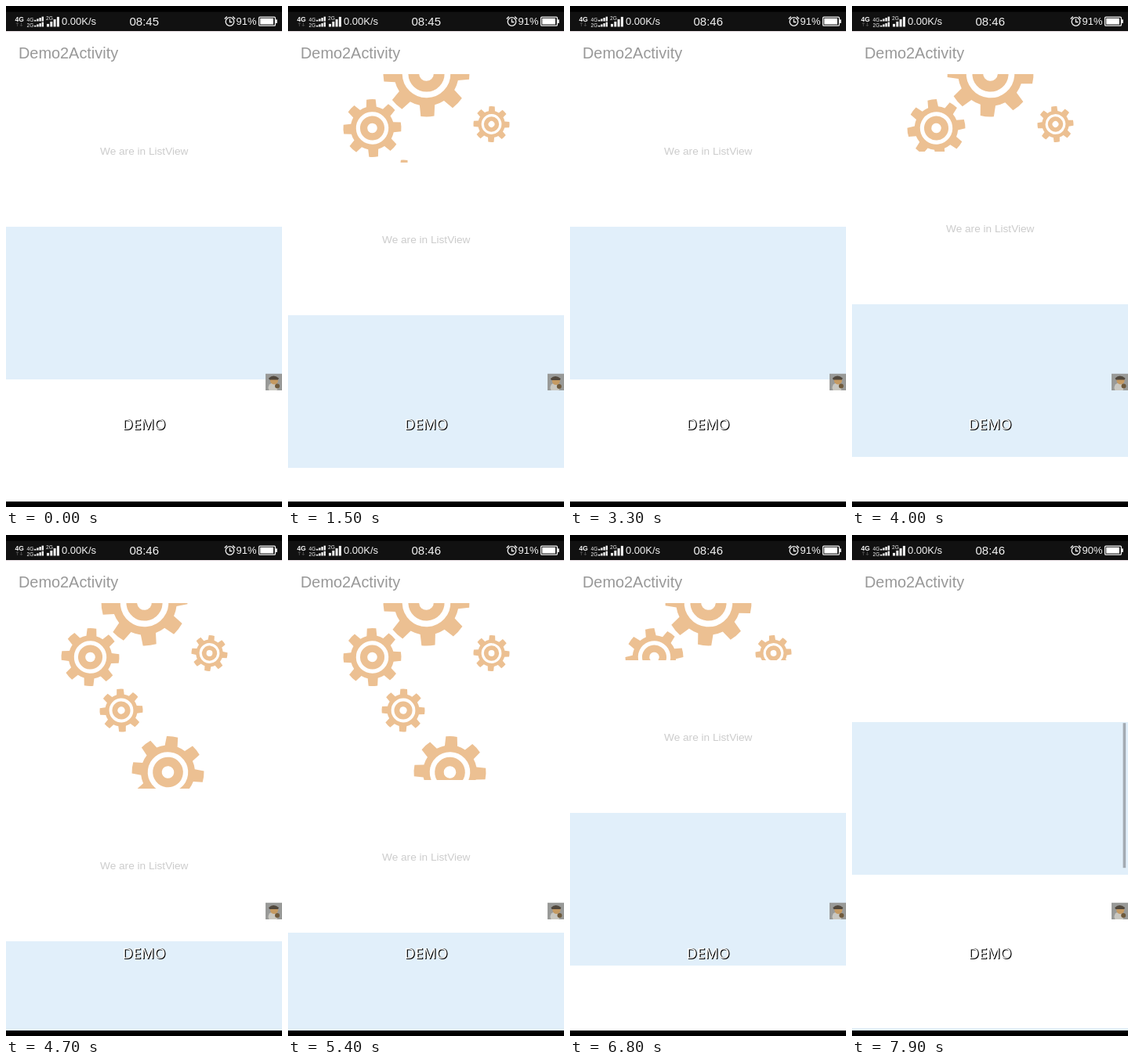
Animation of 352x640 px, one loop 8 s. Source, as an HTML page:

```html
<!DOCTYPE html>
<html lang="en">
<head>
<meta charset="utf-8">
<title>Pull to refresh demo</title>
<style>
  html, body { margin: 0; width: 100%; height: 100%; overflow: hidden; background: #fff; }
  svg { display: block; width: 352px; height: 640px; }
  text { font-family: "Liberation Sans", Arial, sans-serif; }
  .status text { fill: #f2f2f2; }
  .status .tiny { font-size: 6.6px; }
  .demo { font: 18.6px "Noto Sans", sans-serif; fill: #fff; text-shadow: 1px 1px 0 #000, 1px 0 0 #000; }
</style>
</head>
<body>
<svg viewBox="0 0 352 640">
  <defs>
    <linearGradient id="shade" x2="0" y2="1">
      <stop offset="0" stop-color="#c9a9b8" stop-opacity=".4"/>
      <stop offset="1" stop-color="#fff" stop-opacity="0"/>
    </linearGradient>
  </defs>
  <rect width="352" height="640" fill="#fff"/>
  <g id="gears" fill="#ecc092"></g>
  <g id="list" shape-rendering="crispEdges">
    <rect y="86.5" width="352" height="1562" fill="#fff"/>
    <text x="120" y="190" font-size="13.65" fill="#ccc">We are in ListView</text>
  </g>
  <rect id="thumb" x="345.6" width="3.6" height="185" fill="#a3abb2"/>

  <rect width="352" height="86.5" fill="#fff" shape-rendering="crispEdges"/>
  <text x="16" y="67" font-size="19.9" fill="#999">Demo2Activity</text>
  <rect y="32" width="352" height="3" fill="url(#shade)"/>

  <g class="status">
    <rect width="352" height="32" fill="#111"/>
    <rect width="352" height="7.5" fill="#000"/>
    <text x="11.5" y="19.5" font-size="8.5" font-weight="bold">4G</text>
    <path d="M14.5 26v-5m-1.5 2l1.5-2 1.5 2M19.5 21v5m-1.5-2l1.5 2 1.5-2" fill="none" stroke="#444"/>
    <text class="tiny" x="26.5" y="19.5">4G</text>
    <text class="tiny" x="26.5" y="26.5">2G</text>
    <text class="tiny" x="51" y="18">2G</text>
    <g id="bars" fill="#f2f2f2"></g>
    <text x="71" y="24" font-size="13">0.00K/s</text>
    <text id="clock" x="157.5" y="25" font-size="15">08:45</text>
    <g fill="none" stroke="#f2f2f2" stroke-width="1.3">
      <circle cx="285.5" cy="20" r="5.3"/>
      <path d="M285.5 16.5v4h3M278.8 16.5l3-3M292.2 16.5l-3-3"/>
      <rect x="322.6" y="14.1" width="20.8" height="11" rx="1.2"/>
    </g>
    <rect x="324.2" y="15.7" width="16.8" height="7.8" fill="#fff"/>
    <rect x="344" y="17.3" width="1.8" height="4.6" fill="#f2f2f2"/>
    <text id="charge" x="293.5" y="24" font-size="13">91%</text>
  </g>

  <rect y="633" width="352" height="7" fill="#000"/>
  <text class="demo" x="176" y="541" text-anchor="middle">DEMO</text>

  <svg x="331" y="469.5" width="21" height="21.5">
    <rect width="21" height="22" fill="#999a98"/>
    <ellipse cx="9.5" cy="18" rx="6" ry="6" fill="#c9c7c0"/>
    <g id="bust">
      <ellipse cx="11" cy="9" rx="5" ry="5" fill="#c59a62"/>
      <path d="M4 6q6-6 13 0l-1 2H5z" fill="#51483d"/>
      <circle cx="15" cy="16" r="3" fill="#6f5a3c"/>
    </g>
  </svg>
</svg>
<script>
const LOOP = 8000, STEP = 100;
const TOP = 86.5, ITEM = 195.2;
const REST = 73, SETTLE = 420;
const FLING = { start: 7700, span: 200, distance: 433 };

const $ = id => document.getElementById(id);
const progress = (t, start, span) => Math.min(1, Math.max(0, (t - start) / span));
const smooth = x => x * x * (3 - 2 * x);
const easeOut = x => 1 - (1 - x) ** 2;

// Finger drags the list to its peak, lets go, the header rests, then closes
const pulls = [
  { start: 850, span: 850, peak: 120, release: 1700, close: 3000, closeSpan: 300 },
  { start: 3700, span: 1390, peak: 257, release: 5290, close: 6800, closeSpan: 200 }
];

function add(parent, tag, attrs) {
  const el = document.createElementNS("http://www.w3.org/2000/svg", tag);
  for (const key in attrs) el.setAttribute(key, attrs[key]);
  return parent.appendChild(el);
}

function pullAt(t, p) {
  const drag = p.peak * easeOut(progress(t, p.start, p.span));
  const settle = (p.peak - REST) * smooth(progress(t, p.release, SETTLE));
  return drag - settle - REST * smooth(progress(t, p.close, p.closeSpan));
}

function gearPath(r) {
  const root = r * 0.75;
  const at = (radius, deg) => {
    const a = deg * Math.PI / 180;
    return `${radius * Math.sin(a)} ${-radius * Math.cos(a)}`;
  };
  const arc = (radius, deg) => `A${radius} ${radius} 0 0 1 ${at(radius, deg)}`;
  let d = "M" + at(root, -13.5);
  for (let a = 0; a < 360; a += 45)
    d += `L${at(r, a - 9)}${arc(r, a + 9)}L${at(root, a + 13.5)}${arc(root, a + 31.5)}`;
  return d + "Z";
}

function makeGear(x, y, r, dir, phase) {
  const el = add($("gears"), "g", {});
  add(el, "path", { d: gearPath(r) });
  add(el, "circle", { r: r * 0.49, fill: "none", stroke: "#fff", "stroke-width": r * 0.14 });
  add(el, "circle", { r: r * 0.17, fill: "#fff" });
  return angle =>
    el.setAttribute("transform", `translate(${x} ${y}) rotate(${dir * angle + phase})`);
}

const gears = [
  makeGear(176.5, 86.5, 55, 1, 0),
  makeGear(107.5, 156, 37, -1, -4),
  makeGear(259.5, 151, 23, -1, 0),
  makeGear(147, 224, 27.5, 1, 4),
  makeGear(206.5, 303, 46, -1, 0)
];

for (let i = 1; i < 8; i += 2)
  add($("list"), "rect", { y: TOP + i * ITEM, width: 352, height: ITEM, fill: "#e1effa" });

function signal(x, bottom, width, gap, rise) {
  for (let i = 0; i < 4; i++) {
    const height = rise * (i + 1.2);
    add($("bars"), "rect", { x: x + i * gap, y: bottom - height, width, height });
  }
}
signal(36, 19.5, 2.4, 3.2, 1.4);
signal(36, 26.5, 2.4, 3.2, 1.4);
signal(52, 26.5, 3, 4.3, 3);

function draw(t) {
  const pulled = pulls.reduce((sum, p) => sum + pullAt(t, p), 0);
  const scrolled = FLING.distance * progress(t, FLING.start, FLING.span) ** 2;
  $("list").setAttribute("transform", `translate(0 ${Math.round(pulled - scrolled)})`);

  const latest = t < pulls[1].start ? pulls[0] : pulls[1];
  const spin = 0.133 * Math.max(0, t - latest.release - SETTLE);
  gears.forEach(turn => turn(-0.41 * pulled - spin));
  $("gears").style.display = pulled > 0.5 ? "" : "none";

  $("thumb").style.display = scrolled ? "" : "none";
  $("thumb").setAttribute("y", TOP + scrolled * 0.355);
  $("clock").textContent = t < 3000 ? "08:45" : "08:46";
  $("charge").textContent = t < 7500 ? "91%" : "90%";

  const pose = Math.floor(t / 400);
  $("bust").setAttribute("transform", `translate(${0.6 * Math.sin(pose * 2)} ${pose % 2 * 0.6})`);
}

const start = performance.now();
function tick() {
  const t = Math.max(0, performance.now() - start) % LOOP;
  draw(Math.floor(t / STEP) * STEP);
  requestAnimationFrame(tick);
}
tick();
</script>
</body>
</html>
```
